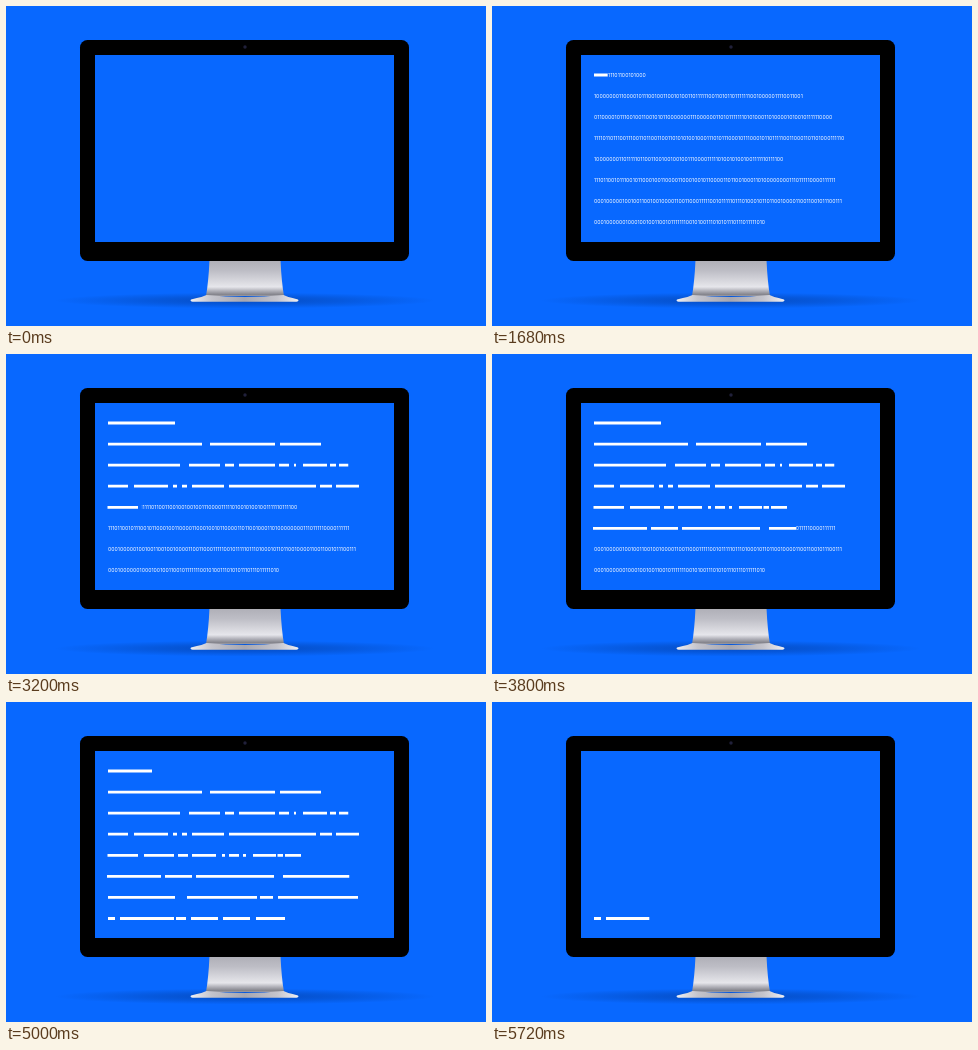
An HTML page for the animation above (5.76 s loop, 480 by 320 pixels).

```html
<!DOCTYPE html>
<html lang="en">
<head>
<meta charset="utf-8">
<title>Binary to lines</title>
<style>
  html, body { margin: 0; width: 100%; height: 100%; overflow: hidden; background: #0868ff; }
  svg { display: block; width: 480px; height: 320px; }
  text { font: 5.2px Inter, "Open Sans", sans-serif; fill: #fff; }
</style>
</head>
<body>
<svg viewBox="0 0 480 320">
  <defs>
    <linearGradient id="neck" x1="0" y1="255" x2="0" y2="293" gradientUnits="userSpaceOnUse">
      <stop offset="0" stop-color="#b0b0b8"/>
      <stop offset=".25" stop-color="#bdbdc5"/>
      <stop offset=".68" stop-color="#e6e6eb"/>
      <stop offset=".78" stop-color="#b4b4bc"/>
      <stop offset=".88" stop-color="#85858d"/>
      <stop offset="1" stop-color="#c6c6ce"/>
    </linearGradient>
    <linearGradient id="foot" x1="184" x2="293" y1="0" y2="0" gradientUnits="userSpaceOnUse">
      <stop offset="0" stop-color="#f0f0f4"/>
      <stop offset=".2" stop-color="#c4c4cc"/>
      <stop offset=".5" stop-color="#a6a6b0"/>
      <stop offset=".8" stop-color="#c4c4cc"/>
      <stop offset="1" stop-color="#f0f0f4"/>
    </linearGradient>
    <radialGradient id="shade">
      <stop offset="0" stop-color="#023a9c" stop-opacity=".6"/>
      <stop offset=".5" stop-color="#023a9c" stop-opacity=".34"/>
      <stop offset="1" stop-color="#023a9c" stop-opacity="0"/>
    </radialGradient>
  </defs>
  <rect width="480" height="320" fill="#0868ff"/>
  <ellipse cx="239" cy="294.5" rx="190" ry="8" fill="url(#shade)"/>
  <path d="M203.500 254H274.500Q275.500 276 278 290H200Q202.500 276 203.500 254Z" fill="url(#neck)"/>
  <path d="M200.500 289Q239 293 277.500 289Q280 290.500 292 293.500Q294 295.800 288 295.800H189Q183 295.800 185 293.500Q198 290.500 200.500 289Z" fill="url(#foot)"/>
  <rect x="74" y="34" width="329" height="221" rx="7.500"/>
  <rect x="89" y="49" width="299" height="187" fill="#0868ff"/>
  <circle cx="239" cy="41" r="1.700" fill="#20203a"/>
  <g id="rows"></g>
</svg>
<script>
const LOOP = 5760, LEFT = 102, PITCH = 21;
const SVG = "http://www.w3.org/2000/svg";

// Each row: opening bits, right edge of the bits, start/end pairs of the bars.
const ROWS = [
  ["010101110110010100", 153, [102, 169]],
  ["100000001100001011100100110010", 312, [102, 196, 204, 269, 274, 315]],
  ["0110000101110010011001010110000", 342,
    [102, 174, 183, 214, 219, 228, 233, 269, 273, 283, 288, 290, 297, 321, 324, 330, 333, 342.5]],
  ["111101101110011100110110011001", 352,
    [102, 122, 128, 162, 167, 171, 176, 181, 186, 218, 223, 310, 314, 326, 330, 353]],
  ["1000000011011111011001100100100", 293,
    [101.5, 132, 138, 168, 172, 182, 186, 210, 216, 219, 223, 233, 237, 240, 247, 270, 271.5, 277, 279, 295]],
  ["1110110010111001011000100110", 343, [101, 155, 159, 186, 190, 268, 277, 343.5]],
  ["000100000100100110010010000", 351, [102, 169, 181, 251, 254, 267, 272, 352]],
  ["0001000000100010010011001011", 275, [102, 109, 114, 168, 170, 180, 185, 212, 217, 244, 250, 279]]
];

// Start and end time of each pass over a row.
const typing = i => [43 + 180 * i, i === 7 ? 1575 : 223 + 180 * i];
const barring = i => [i ? 1688 + 362 * i : 1580, i === 7 ? 4604 : 2050 + 362 * i];
const erasing = i => [4968 + 98 * i, 5066 + 98 * i];

const progress = (t, [from, to]) => Math.min(1, Math.max(0, (t - from) / (to - from)));

function add(parent, tag, attrs) {
  const el = document.createElementNS(SVG, tag);
  for (const key in attrs) el.setAttribute(key, attrs[key]);
  return parent.appendChild(el);
}

const pen = document.createElement("canvas").getContext("2d");
pen.font = '52px Inter, "Open Sans", sans-serif';
const textWidth = s => pen.measureText(s).width / 10;

let seed = 7;
function random() {
  seed = (seed * 16807) % 2147483647;
  return seed / 2147483647;
}

function fillBits(bits, width) {
  while (textWidth(bits) < width - 1) bits += random() < 0.5 ? "0" : "1";
  while (textWidth(bits) > width + 1) bits = bits.slice(0, -1);
  return bits;
}

function addClip(parent, id, y) {
  const clip = add(parent, "clipPath", { id });
  return add(clip, "rect", { x: 0, y, width: 0, height: 12 });
}

const host = document.getElementById("rows");
const rows = ROWS.map(([bits, textEnd, bars], i) => {
  const top = 63 + PITCH * i;
  const textClip = addClip(host, "text" + i, top);
  const barClip = addClip(host, "bar" + i, top);
  const label = add(host, "text", { x: LEFT, y: 71 + PITCH * i, "clip-path": `url(#text${i})` });
  label.textContent = fillBits(bits, textEnd - LEFT);
  let d = "";
  for (let k = 0; k < bars.length; k += 2) d += `M${bars[k]} ${67.6 + 21.07 * i}H${bars[k + 1]}v2.8H${bars[k]}z`;
  add(host, "path", { d, fill: "#fff", "clip-path": `url(#bar${i})` });
  return { textClip, barClip, textEnd, barEnd: bars[bars.length - 1] };
});

function setSpan(rect, from, to) {
  rect.setAttribute("x", from);
  rect.setAttribute("width", Math.max(0, to - from));
}

function draw(t) {
  rows.forEach((row, i) => {
    const start = LEFT - 1, length = row.barEnd - start;
    const typed = start + (row.textEnd + 1 - start) * progress(t, typing(i));
    const barred = start + length * progress(t, barring(i));
    const kept = row.barEnd - length * progress(t, erasing(i));
    setSpan(row.textClip, barred, typed);
    setSpan(row.barClip, start, Math.min(barred, kept));
  });
}

const began = performance.now();
function tick() {
  draw((performance.now() - began) % LOOP);
  requestAnimationFrame(tick);
}
draw(0);
requestAnimationFrame(tick);
</script>
</body>
</html>
```
